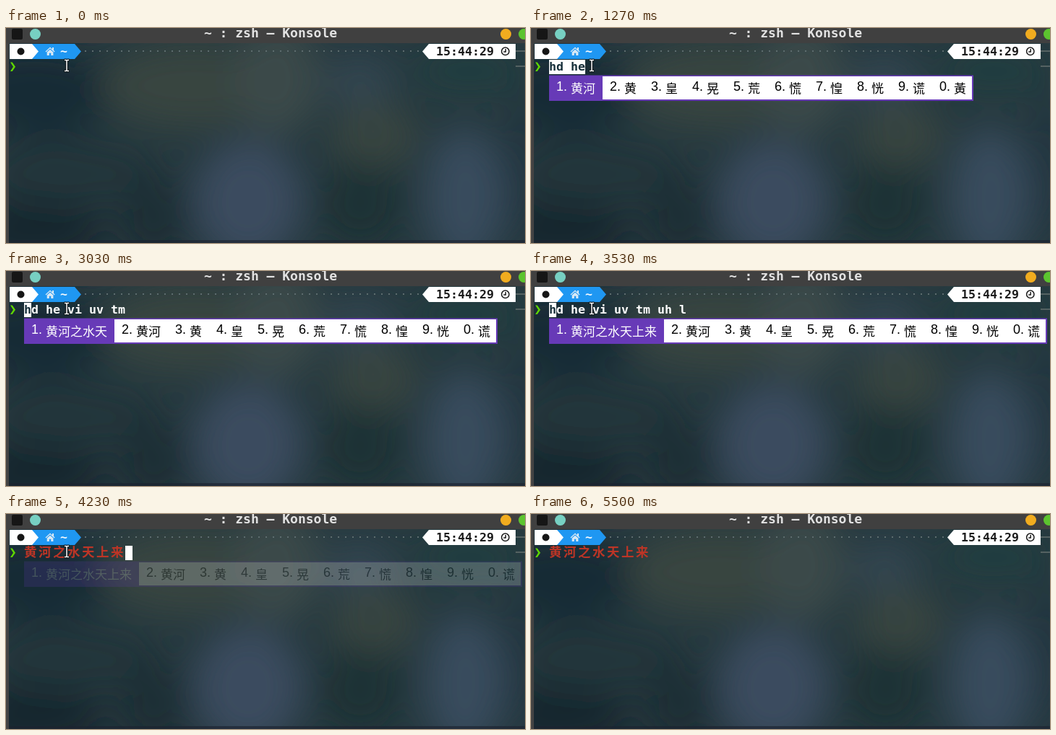
Write an HTML page that moves like this. It is 718x298 px and loops after 5.56 s.

```html
<!DOCTYPE html>
<html lang="zh-CN">
<head>
<meta charset="utf-8">
<title>Terminal pinyin input</title>
<style>
  html, body { margin: 0; width: 100%; height: 100%; overflow: hidden; background: #263a41; }
  svg { display: block; width: 718px; height: 298px; }
  text { white-space: pre; }
  .mono { font: bold 16.61px "DejaVu Sans Mono", monospace; }
  .title { font: bold 18px "DejaVu Sans Mono", monospace; }
  .label { font: 18px "Liberation Sans", Arial, sans-serif; }
  .han { font: 17px "Noto Sans CJK SC", "Noto Sans CJK", sans-serif; }
  .done { font: bold 17.5px "Noto Sans CJK SC", "Noto Sans CJK", sans-serif; fill: #bd3526; }
</style>
</head>
<body>
<svg viewBox="0 0 718 298">
  <defs>
    <filter id="soft" x="-60%" y="-60%" width="220%" height="220%"><feGaussianBlur stdDeviation="24"/></filter>
  </defs>
  <rect width="718" height="298" fill="#26393f"/>
  <g id="blobs" filter="url(#soft)"></g>

  <rect y="294" width="718" height="4" fill="#1c2330" opacity=".65"/>
  <rect width="718" height="21" fill="#404040"/>
  <rect y="21" width="4" height="277" fill="#434343"/>
  <rect x="8" y="1" width="15" height="15" rx="2" fill="#161616"/>
  <circle cx="40.5" cy="8.5" r="7.5" fill="#77d0c2"/>
  <circle cx="691.5" cy="8.5" r="7.5" fill="#f1ac1f"/>
  <circle cx="716.5" cy="8.5" r="7.5" fill="#5cc42f"/>
  <text class="title" x="366" y="13" text-anchor="middle" fill="#e2e2e2">~ : zsh — Konsole</text>

  <path d="M35 22H95L104 32.5L95 43H35Z" fill="#1f97f2"/>
  <path d="M5 22H36L45 32.5L36 43H5Z" fill="#fff"/>
  <circle cx="20.5" cy="32.5" r="5" fill="#161616"/>
  <path d="M54.5 32.5L61 26.5L64 29.2V27H66V31L67.6 32.5L66.7 33.4L61 28.2L55.4 33.4ZM56.7 33.6L61 29.7L65.4 33.6V38H62.3V34.7H59.8V38H56.7Z" fill="#d9e9f5"/>
  <text class="mono" x="75" y="38" fill="#f2f8fd">~</text>
  <path d="M109 32H572" stroke="#5d6c6e" stroke-width="2" stroke-dasharray="2 8"/>
  <path d="M705 22H585L576 32.5L585 43H705Z" fill="#fff"/>
  <text class="mono" x="595" y="38" fill="#1c1c1c">15:44:29</text>
  <g fill="none" stroke="#1c1c1c" stroke-width="1.5">
    <circle cx="690.8" cy="32.3" r="5.2"/>
    <path d="M691.2 29V33H688.3"/>
  </g>
  <path d="M705 32H718M705 53H718" stroke="#66706f" stroke-width="1.5"/>
  <path d="M6 47.5H8.7L13 53.7L8.7 60H6L10 53.7Z" fill="#5fd700"/>

  <g id="line"></g>
  <g id="popup"></g>
  <g id="mouse" fill="none">
    <path id="beam" d="M-3.5 -7.5H-1Q0 -7.5 0 -6.5Q0 -7.5 1 -7.5H3.5M0 -7V7M-3.5 7.5H-1Q0 7.5 0 6.5Q0 7.5 1 7.5H3.5" stroke="#10181c" stroke-width="3.4"/>
    <use href="#beam"/>
    <path d="M-3 -7.5H-1Q0 -7.5 0 -6.5Q0 -7.5 1 -7.5H3M0 -7V7M-3 7.5H-1Q0 7.5 0 6.5Q0 7.5 1 7.5H3" stroke="#fff" stroke-width="1.5"/>
  </g>
</svg>
<script>
const LOOP = 5560, CELL = 10, LEFT = 25;
const $ = id => document.getElementById(id);

// Backdrop: cx, cy, rx, ry, colour
$('blobs').innerHTML = [
  [40, 90, 110, 60, '#172b35'],
  [90, 200, 130, 50, '#22363a'],
  [30, 285, 110, 45, '#15272f'],
  [205, 265, 50, 60, '#1b2f34'],
  [260, 80, 130, 60, '#38453f'],
  [375, 70, 60, 80, '#3b4849'],
  [490, 75, 50, 40, '#30454f'],
  [510, 150, 60, 45, '#38443f'],
  [490, 245, 60, 60, '#1b3036'],
  [335, 240, 75, 85, '#3a4c5e'],
  [640, 60, 80, 35, '#243d40'],
  [635, 235, 55, 95, '#394b5d'],
  [715, 190, 22, 110, '#22363f']
].map(([x, y, a, b, c]) => `<ellipse cx="${x}" cy="${y}" rx="${a}" ry="${b}" fill="${c}"/>`).join('');

const SINGLES = '黄皇晃荒慌惶恍谎黃煌';
const VERSE = '黄河之水天上来';
const words = (...heads) => [...heads, ...SINGLES].slice(0, 10);
const verse = n => words(VERSE.slice(0, n), '黄河');

// time, typed keys, candidates, reversed line
const he = words('黄河'), tian = verse(5);
const STEPS = [
  [630, 'h', [...'和好会后还或很话化回'], true],
  [830, 'hd', words(), true],
  [1270, 'hd he', he, true],
  [1600, 'hd he', he, false],
  [1640, 'hd he v', words('黄河之', '黄河中', '黄河州', '黄河镇', '黄河'), true],
  [1770, 'hd he vi', verse(3), true],
  [2070, 'hd he vi', verse(3), false],
  [2110, 'hd he vi u', words('黄河之水', '黄河之上', '黄河'), true],
  [2230, 'hd he vi uv', verse(4), true],
  [2570, 'hd he vi uv', verse(4), false],
  [2610, 'hd he vi uv t', words('黄河之水天', '黄河之水', '黄河'), true],
  [2800, 'hd he vi uv tm', tian, true],
  [3030, 'hd he vi uv tm', tian, false],
  [3070, 'hd he vi uv tm u', tian, false],
  [3100, 'hd he vi uv tm u', words('黄河之水天是', '黄河之水', '黄河'), true],
  [3330, 'hd he vi uv tm uh', verse(6), true],
  [3530, 'hd he vi uv tm uh l', verse(7), false],
  [3730, 'hd he vi uv tm uh ll', verse(7), false]
];
const COMMIT = 4030;

const rect = (x, y, w, h, fill) => `<rect x="${x}" y="${y}" width="${w}" height="${h}" fill="${fill}"/>`;
const text = (cls, x, y, s, fill) => `<text class="${cls}" x="${x}" y="${y}" fill="${fill}">${s}</text>`;
const block = (col, n = 1) => rect(LEFT + col * CELL, 44, n * CELL, 20, '#fff');
const clamp = v => Math.max(0, Math.min(1, v));

function preedit(keys, reversed) {
  const dark = '#17303b';
  if (reversed) return block(0, keys.length) + text('mono', LEFT, 59, keys, dark);
  return block(0) + text('mono', LEFT, 59, keys[0], dark) +
    text('mono', LEFT + CELL, 59, keys.slice(1), '#fff');
}

function committed(cursor) {
  const han = [...VERSE].map((c, i) => `<text class="done" x="${LEFT + i * 20}" y="59">${c}</text>`);
  return han.join('') + (cursor ? block(14) : '');
}

function candidates(list) {
  let x = LEFT, out = '', first = 0;
  list.forEach((word, i) => {
    const ink = i ? '#000' : '#fff', w = 40 + 17 * word.length;
    if (!i) first = w;
    out += text('label', x + 10, 87, (i + 1) % 10 + '.', ink) + text('han', x + 30, 90, word, ink);
    x += w;
  });
  const purple = '#673ab7';
  return rect(LEFT, 65.5, x - LEFT, 35.5, purple) +
    rect(LEFT + first, 67, x - LEFT - first - 2, 32, '#fff') + out;
}

const shown = {};
function put(id, html) {
  if (shown[id] !== html) $(id).innerHTML = shown[id] = html;
}

function draw(t) {
  const step = STEPS.filter(s => s[0] <= t).pop();
  if (!step) put('line', t >= 170 ? block(0) : '');
  else if (t < COMMIT) put('line', preedit(step[1], step[3]));
  else put('line', committed(t < 4500 || (t >= 5000 && t < 5500)));

  const alpha = clamp((t - 615) / 190) * (1 - clamp((t - 4033) / 245));
  put('popup', step && alpha ? candidates(step[2]) : '');
  $('popup').setAttribute('opacity', alpha);

  const p = clamp((t - 5030) / 440), k = p * p * (3 - 2 * p);
  $('mouse').setAttribute('transform', `translate(${84 - 68 * k} ${52 - 64 * k})`);
}

const start = performance.now();
function tick() {
  draw((performance.now() - start) % LOOP);
  requestAnimationFrame(tick);
}
draw(0);
requestAnimationFrame(tick);
</script>
</body>
</html>
```
